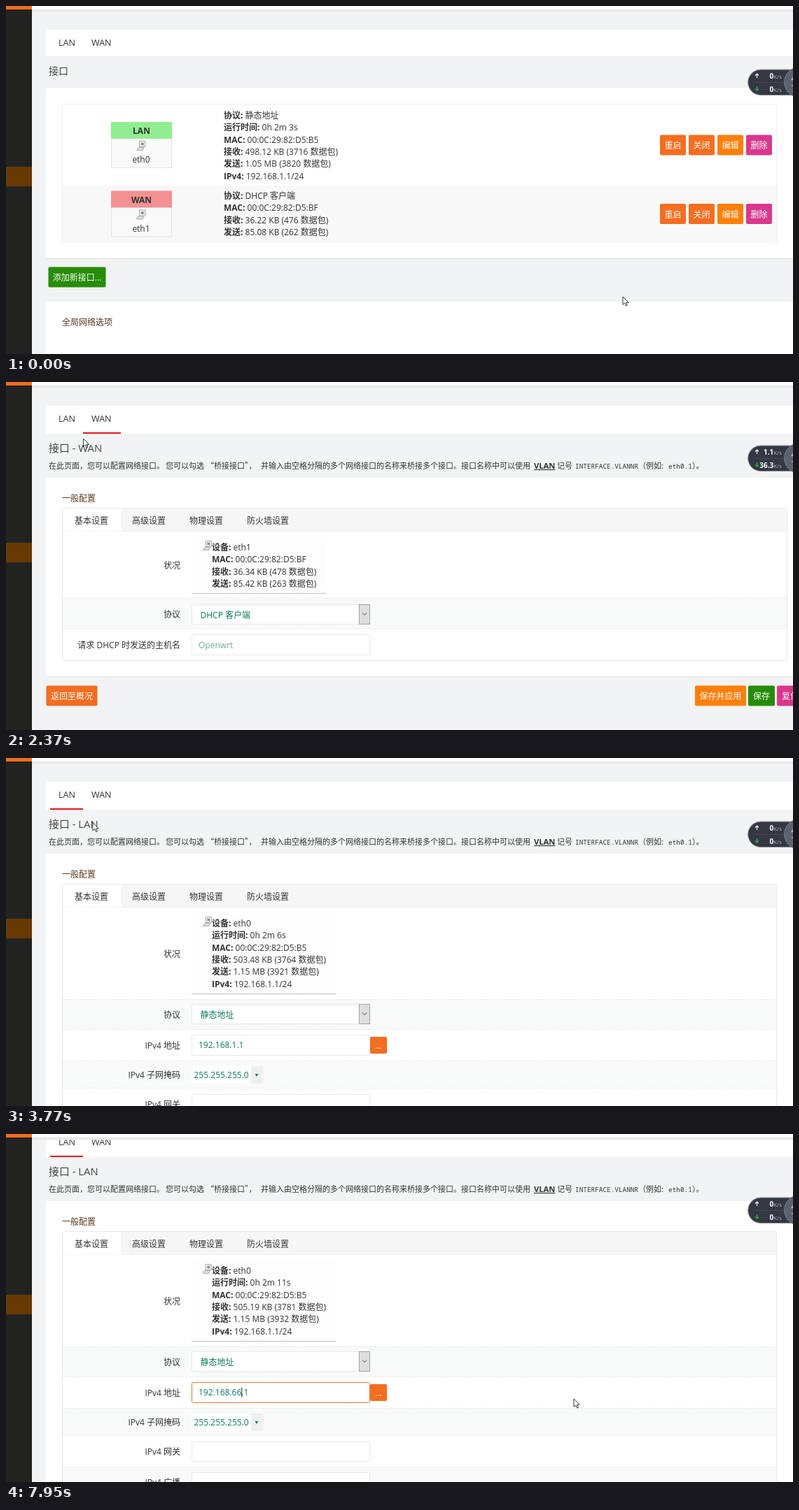
Animation of 1124x498 px, one loop 8 s. Source, as an HTML page:

```html
<!DOCTYPE html>
<html lang="zh-CN">
<head>
<meta charset="utf-8">
<title>接口</title>
<style>
html, body { margin: 0; width: 100%; height: 100%; overflow: hidden; background: #f1f3f4; }
svg { display: block; width: 100vw; height: 100vh; }
text { font-family: "Open Sans", "Noto Sans CJK SC DemiLight", "Noto Sans CJK SC Light", "Noto Sans CJK SC", sans-serif; font-size: 12px; fill: #333; }
.b { font-family: "Open Sans", "Noto Sans CJK SC", sans-serif; font-weight: 700; }
.w { fill: #fff; }
.h { font-size: 14.9px; fill: #444; }
.d { font-family: "Noto Sans CJK SC DemiLight", "Noto Sans CJK SC Light", "Noto Sans CJK SC", sans-serif; font-size: 11px; }
.m { font-family: "Noto Sans Mono", monospace; font-size: 9.4px; }
.g { fill: #087a5e; }
.leg { fill: #55391a; }
</style>
</head>
<body>
<svg id="stage" viewBox="0 0 1124 498"></svg>
<script>
const ORANGE = '#f46d20', AMBER = '#ff7f0a', PINK = '#d9388c', GREEN = '#278c06';
const LOOP = 8000;

const rect = (x, y, w, h, fill, extra = '') =>
  `<rect x="${x}" y="${y}" width="${w}" height="${h}" fill="${fill}" ${extra}/>`;
const text = (x, y, s, cls = '', extra = '') =>
  `<text x="${x}" y="${y}" class="${cls}" ${extra}>${s}</text>`;
const mid = (x, y, s, cls) => text(x, y, s, cls, 'text-anchor="middle"');
const right = (y, s) => text(249, y, s, '', 'text-anchor="end"');
const frame = (x, y, w, h, color = '#e6e8e8', r = 2, fill = '#fff') =>
  rect(x + .5, y + .5, w - 1, h - 1, fill, `stroke="${color}" rx="${r}"`);
const button = (x, y, w, fill, s, h = 30) =>
  rect(x + .5, y + .5, w - 1, h - 1, fill, 'rx="2"') + mid(x + w / 2, y + h / 2 + 5, s, 'w');
const dash = (y, w) =>
  `<path d="M81 ${y + .5}H${80 + w}" stroke="#e9ecec" stroke-dasharray="3 2"/>`;
const panel = (y, h) => rect(57, y + 1, 1090, h, '#dfe2e3', 'rx="4"') + rect(57, y, 1090, h, '#fff', 'rx="4"');
const info = (x, y, rows) => rows.map(([k, v], i) =>
  text(x, y + i * 17.35, `<tspan class="b">${k}:</tspan> ${v}`)).join('');

// Small network adapter symbol, 14 px wide
const port = (x, y) => `<g transform="translate(${x} ${y})" fill="none" stroke="#a9adb2">
  <path d="M4.5 .5H13V8.5H4.5Z" fill="#eef0f2"/><path d="M7 3h3.5v3H7Z" fill="#777c82"/>
  <path d="M.5 13.5L3 9.5H11L9 13.5Z" fill="#dcdfe2"/></g>`;

const tabs = (h, lan, wan) => rect(57, 34, 1067, h, '#fff') +
  (lan || '') + (wan ? rect(110, 72, 54, 2, '#ee1414') : '') +
  text(75, 57, 'LAN', '', 'style="font-size:12.6px"') +
  text(122, 57, 'WAN', '', 'style="font-size:12.6px"');
const lanLine = id => rect(63, 72, 47, 2, '#ee1414', id ? `id="${id}"` : '');

function badge(y, name, dev, fill) {
  return frame(150, y, 87, 66, '#e4e4e4', 0, '#f9f9f9') + rect(150, y, 87, 24, fill) +
    mid(193.5, y + 17, name, 'b') + port(186, y + 27) + mid(193, y + 58, dev);
}

const actions = y => [['重启', ORANGE], ['关闭', ORANGE], ['编辑', AMBER], ['删除', PINK]]
  .map(([s, c], i) => button(933.5 + i * 41, y, 38, c, s)).join('');

function listPage() {
  return tabs(38) + text(61, 98, '接口', 'h', 'style="font-size:14px"') + panel(117, 244) +
    frame(80, 140, 1021, 198.5, '#eceeee', 2) + rect(81, 257, 1019, 81, '#f8f8f8') +
    badge(166, 'LAN', 'eth0', '#90ee90') + badge(264.5, 'WAN', 'eth1', '#f29191') +
    info(311, 161, [['协议', '静态地址'], ['运行时间', '0h 2m 3s'], ['MAC', '00:0C:29:82:D5:B5'],
      ['接收', '498.12 KB (3716 数据包)'], ['发送', '1.05 MB (3820 数据包)'], ['IPv4', '192.168.1.1/24']]) +
    info(311, 276, [['协议', 'DHCP 客户端'], ['MAC', '00:0C:29:82:D5:BF'],
      ['接收', '36.22 KB (476 数据包)'], ['发送', '85.08 KB (262 数据包)']]) +
    actions(184) + actions(282.5) + button(60, 373, 83, GREEN, '添加新接口...') +
    panel(423, 120) + text(80, 457, '全局网络选项', 'leg');
}

function formHead(name, panelH, w) {
  return text(61, 99.5, '接口 - ' + name, 'h') +
    text(61, 124, '在此页面，您可以配置网络接口。', 'd') + text(228, 124, '您可以勾选', 'd') +
    text(286, 124, '“桥接接口”，', 'd') +
    text(364, 124, '并输入由空格分隔的多个网络接口的名称来桥接多个接口。接口名称中可以使用', 'd') +
    text(754, 124, 'VLAN', 'b', 'style="font-size:11.2px" text-decoration="underline"') +
    text(787, 124, '记号', 'd') + text(813, 124, 'INTERFACE.VLANNR', 'm') +
    text(903, 124, '（例如:', 'd') + text(946, 124, 'eth0.1', 'm') + text(980, 124, '）。', 'd') +
    panel(137, panelH) + text(80, 171, '一般配置', 'leg') +
    frame(80, 180, w, panelH - 65, '#e6e8e8', 3) + rect(81, 181, w - 2, 33, '#f6f6f6') +
    rect(81, 181, 83, 33, '#fff') + dash(213, w) +
    ['基本设置', '高级设置', '物理设置', '防火墙设置'].map((s, i) => text(98 + i * 82, 203, s)).join('');
}

const card = (w, h) => rect(265, 222, w, h, '#fdfdfd') + rect(265, 221 + h, w, 1.2, '#c4c6c6') + port(280.5, 227);
const select = (y, s) => frame(265, y, 255, 29) + text(277.5, y + 19.5, s, 'g') +
  frame(504, y, 16, 29, '#a2a2a2', 0, '#dedede') +
  `<path d="M509 ${y + 12.5}l3 3 3-3" fill="none" stroke="#444"/>`;

function wanPage() {
  return tabs(40, lanLine('hover'), true) + formHead('WAN', 284, 1036) + '<g id="wanBody">' +
    rect(81, 309, 1034, 45, '#f8f9f9') + dash(309, 1036) + dash(353, 1036) +
    card(192, 81) + info(294, 241, [['设备', 'eth1'], ['MAC', '00:0C:29:82:D5:BF'],
      ['接收', '36.34 KB (478 数据包)'], ['发送', '85.42 KB (263 数据包)']]) +
    right(267, '状况') + right(337, '协议') + select(318, 'DHCP 客户端') +
    right(381, '请求 DHCP 时发送的主机名') + frame(265, 361, 255, 30) +
    text(275, 381, 'Openwrt', '', 'style="fill:#6fa999"') + '</g>' +
    button(57, 434, 74, ORANGE, '返回至概况') + button(983.5, 434, 74, AMBER, '保存并应用') +
    button(1059.5, 434, 39, GREEN, '保存') + button(1100.5, 434, 39, PINK, '复位');
}

const lanInfo = (up, rx, tx) => info(294, 241, [['设备', 'eth0'], ['运行时间', up], ['MAC', '00:0C:29:82:D5:B5'],
  ['接收', rx], ['发送', tx], ['IPv4', '192.168.1.1/24']]);

function lanPage() {
  return tabs(40, lanLine()) + formHead('LAN', 600, 1021) + '<g id="lanBody">' +
    [[345, 44], [433, 40], [517, 44]].map(([y, h]) =>
      rect(81, y, 1019, h, '#f8f9f9') + dash(y, 1021) + dash(y + h - 1, 1021)).join('') +
    card(206, 116) +
    `<g id="before">${lanInfo('0h 2m 6s', '503.48 KB (3764 数据包)', '1.15 MB (3921 数据包)')}</g>` +
    `<g id="after">${lanInfo('0h 2m 11s', '505.19 KB (3781 数据包)', '1.15 MB (3932 数据包)')}</g>` +
    right(285, '状况') + right(372, '协议') + select(352, '静态地址') +
    right(415.5, 'IPv4 地址') +
    '<rect id="field" x="265.5" y="396.5" width="254" height="29" rx="2" fill="#fff"/>' +
    text(275, 415, '', 'g', 'id="ip"') + rect(0, 404, 1, 14, '#222', 'id="caret"') +
    rect(520, 399, 24, 24, ORANGE, 'rx="2"') + mid(532, 416, '...', 'w') +
    right(458, 'IPv4 子网掩码') + rect(265, 441, 85, 25, '#fff') + rect(350, 441, 17.5, 25, '#eef0f0') +
    text(268.5, 458, '255.255.255.0', 'g') + '<path d="M355.5 452h5l-2.5 4z" fill="#087a5e"/>' +
    right(500, 'IPv4 网关') + frame(265, 481, 255, 29) +
    right(544, 'IPv4 广播') + frame(265, 525, 255, 29) + '</g>';
}

const speed = (y, id) => `<text x="1108" y="${y}" text-anchor="end" style="fill:#aab0bb;font-size:8px">` +
  `<tspan id="${id}" style="fill:#fff;font-size:10px;font-weight:700"></tspan>K/s</text>`;
const arrow = (y, dir, c) =>
  `<path d="M1072.5 ${y + 3 * dir}v${-6 * dir}m-2.5 ${2.5 * dir}l2.5 ${-2.5 * dir} 2.5 ${2.5 * dir}" fill="none" stroke="${c}" stroke-width="1.4"/>`;

const stage = document.getElementById('stage');
stage.innerHTML = rect(0, 0, 1124, 498, '#f1f3f4') +
  `<g id="list">${listPage()}</g><g id="wan">${wanPage()}</g><g id="lan">${lanPage()}</g>` +
  rect(37, 5, 1087, 1.5, '#dcdfe1') + rect(37, 6.5, 1087, 2, '#e8ebec') + rect(37, 0, 1087, 5, '#fff') +
  rect(0, 0, 37, 498, '#222220') + rect(0, 0, 37, 5, ORANGE) + rect(0, 230, 37, 28, '#663a00') +
  `<g id="veil">${rect(0, 0, 1124, 498, '#efefef')}<g id="load">` +
  text(541, 48, 'Loading...', '', 'style="font-size:12.8px;fill:#666"') +
  `<g id="spin" fill="none" stroke="#888"><rect x="-5" y="-5" width="10" height="10"/><path d="M-2.5 -1.5h2m1 0h2m-5 3h2m1 0h2"/></g></g></g>` +
  `<g><path d="M1124 91H1078a18 18 0 0 0 0 36.5H1124Z" fill="#343842" stroke="#8b8f97"/>
  <path d="M1066 109.5H1113" stroke="#454a55"/>
  <circle cx="1133" cy="109" r="21.5" fill="#5d6271" stroke="#737885"/>
  <path d="M1124 102l-2 3.5h2M1122 114h2" stroke="#d5d8de" fill="none"/>` +
  arrow(100, 1, '#dfe2e6') + arrow(118, -1, '#2fae2f') + speed(103.5, 'up') + speed(122.5, 'down') + '</g>' +
  '<circle id="ring" r="10" fill="#f4f23c" style="mix-blend-mode:multiply"/>' +
  `<g id="mouse"><path id="point" d="M0 0V11.5L2.7 9 4.6 13.2 6.4 12.4 4.6 8.4H8.2Z" fill="#fff" stroke="#222" stroke-width=".9"/>
  <path id="hand" d="M-1.5 1.2Q0 -1 1.5 1.2V6L6.5 7.2Q8 8 7.5 11L6.3 15H-1L-4.5 9.5Q-4.5 7.5-1.5 9Z" fill="#fff" stroke="#222" stroke-width=".9"/>
  <path id="beam" d="M-3 -7.5Q0 -7.5 0 -6Q0 -7.5 3 -7.5M0 -6V6M-3 7.5Q0 7.5 0 6Q0 7.5 3 7.5" fill="none" stroke="#333"/></g>`;

const el = {};
stage.querySelectorAll('[id]').forEach(n => el[n.id] = n);
const show = (name, on) => el[name].setAttribute('visibility', on ? 'inherit' : 'hidden');
const clamp = v => Math.max(0, Math.min(1, v));
const within = (t, a, b) => t >= a && t < b;
const latest = (t, steps) => steps.filter(s => s[0] <= t).pop();

// Pointer stops: time, x, y
const path = [[0, 881, 416], [780, 1034, 299], [930, 1034, 299], [1430, 678, 342], [1700, 678, 342],
  [2370, 110.5, 81], [2520, 90, 56], [2840, 90, 56], [3000, 92, 56], [3640, 92, 56], [4280, 386, 392],
  [4500, 333, 413], [4700, 329, 413], [5450, 329, 413], [5780, 317, 415], [5980, 317, 415],
  [6170, 334.5, 428], [6740, 334.5, 428], [7090, 396, 430], [7280, 396, 430], [7800, 811, 379], [LOOP, 811, 379]];
const rates = [[0, '0', '0'], [600, '1.2', '0.9'], [1640, '1.1', '36.3'], [2520, '0', '0'],
  [4560, '0.3', '0'], [5600, '0', '0']];
// Address as typed, with the caret offset
const typed = [[0, '192.168.1.1', 9], [5700, '192.168..1', 8], [6550, '192.168.6.1', 9], [6850, '192.168.66.1', 10]];
const clicks = [[830, 910, 1034, 300], [2690, 2840, 89.5, 56.5], [5000, 5170, 328, 414]];

function pointer(t) {
  const i = path.findIndex(p => p[0] > t), a = path[i - 1], b = path[i];
  const p = (t - a[0]) / (b[0] - a[0]), e = p * p * (3 - 2 * p);
  return [a[1] + (b[1] - a[1]) * e, a[2] + (b[2] - a[2]) * e];
}

function veil(t) {
  const [from, end] = t < 2840 ? [910, 1690] : [2840, 3510];
  return t < from ? 0 : .5 - .5 * Math.cos(Math.PI * clamp((end - t) / 600));
}

function draw(t) {
  show('list', t < 910);
  show('wan', within(t, 910, 2840));
  show('lan', t >= 2840);
  show('hover', within(t, 2500, 2840));

  const scroll = 41 * (1 - (1 - clamp((t - 7780) / 170)) ** 2);
  el.lan.setAttribute('transform', `translate(0 ${-scroll})`);
  show('before', t >= 2840 && t < 7600);
  show('after', t >= 7600);

  const focus = t >= 5060, [, ip, at] = latest(t, typed);
  if (el.ip.textContent !== ip) el.ip.textContent = ip;
  el.field.setAttribute('stroke', focus ? '#dc7a3c' : '#e6e8e8');
  show('caret', focus);
  el.caret.setAttribute('x', 275 + el.ip.getSubStringLength(0, at));

  // The form fades in while the veil fades out
  const cover = veil(t);
  el.veil.setAttribute('opacity', cover);
  el.wanBody.setAttribute('opacity', 1 - cover);
  el.lanBody.setAttribute('opacity', 1 - cover);
  el.load.setAttribute('transform', `translate(${t < 2840 ? 0 : -7.5} 0)`);
  el.spin.setAttribute('transform', `translate(480 42) rotate(${(t - 1400) * .72})`);

  const [, up, down] = latest(t, rates);
  el.up.textContent = up;
  el.down.textContent = down;

  const click = clicks.find(c => within(t, c[0], c[1]));
  show('ring', !!click);
  if (click) {
    el.ring.setAttribute('cx', click[2]);
    el.ring.setAttribute('cy', click[3]);
  }

  const [x, y] = pointer(t);
  const beam = within(t, 4400, 6080), hand = within(t, 740, 910) || within(t, 2490, 2840);
  el.mouse.setAttribute('transform', `translate(${x} ${y})`);
  show('beam', beam);
  show('hand', hand);
  show('point', !beam && !hand);
}

const start = performance.now();
function tick(now) {
  draw(Math.max(0, now - start) % LOOP);
  requestAnimationFrame(tick);
}
draw(0);
requestAnimationFrame(tick);
</script>
</body>
</html>
```
